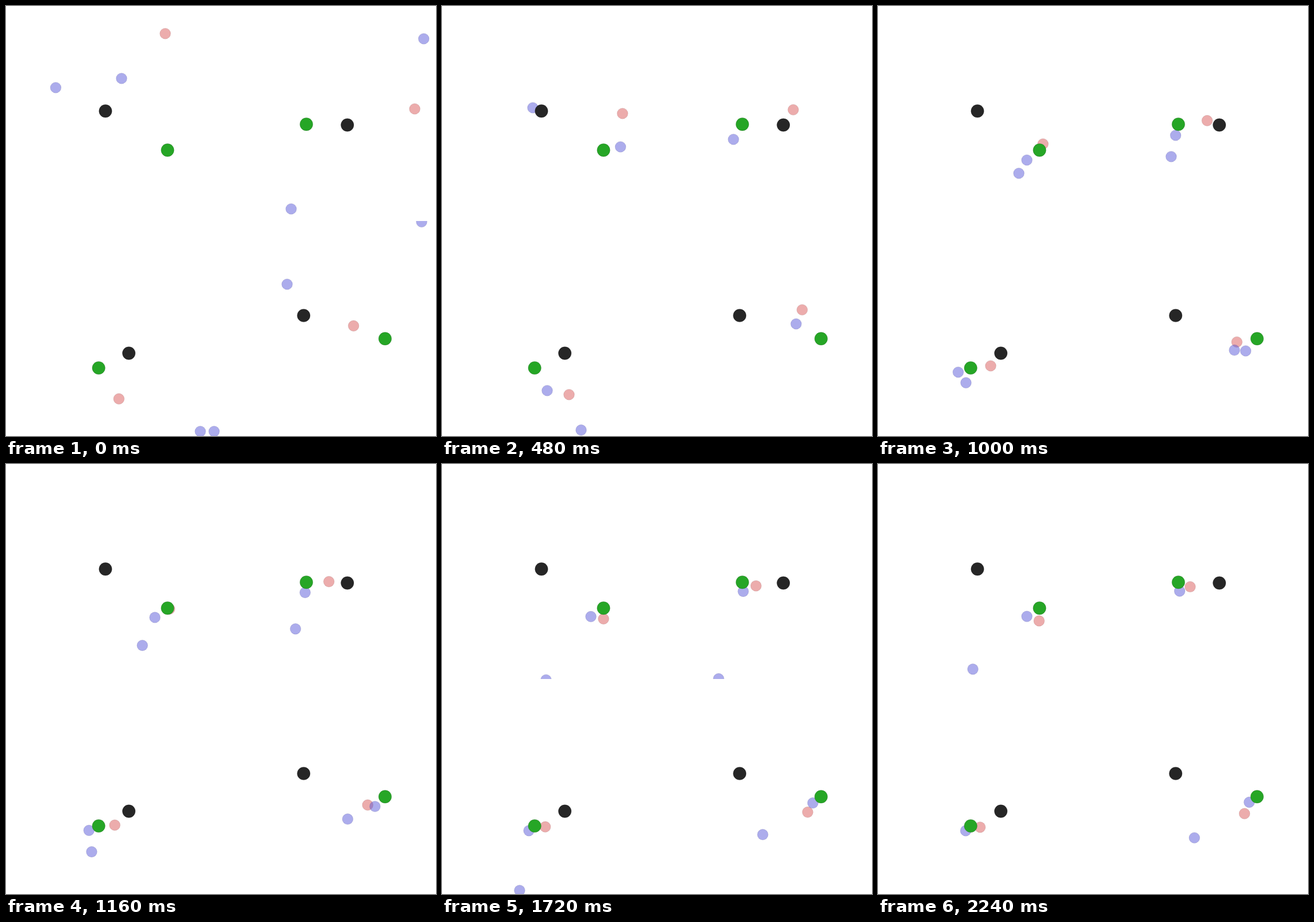
Write an HTML page with a canvas that moves like this. It is 748 px wide and 748 px high and loops after 2.28 s.

```html
<!DOCTYPE html>
<html lang="en">
<head>
<meta charset="utf-8">
<title>Four particle worlds</title>
<style>
  html, body { margin: 0; width: 100%; height: 100%; overflow: hidden; background: #fff; }
  canvas { display: block; width: 748px; height: 748px; }
</style>
</head>
<body>
<canvas id="stage" width="748" height="748"></canvas>
<script>
const ctx = document.getElementById('stage').getContext('2d');
const STEP_MS = 40, STEPS = 57, SIDE = 374;
const AGENT_R = SIDE * 0.025, MARK_R = SIDE * 0.03;
const RED = [217, 89, 89], BLUE = [89, 89, 217];
const BLACK = [38, 38, 38], GREEN = [38, 166, 38];
const SETTLE_RATE = 0.11;

// One coordinate: a smooth curve from rest through the keys, then a tail of n steps.
function curve(steps, values, endSlope, tail) {
  const last = steps.length - 1;
  const slope = i => (values[i + 1] - values[i]) / (steps[i + 1] - steps[i]);
  const tangent = i => {
    if (i === 0) return 0;
    if (i === last) return endSlope;
    const before = steps[i] - steps[i - 1], after = steps[i + 1] - steps[i];
    return (slope(i - 1) * after + slope(i) * before) / (before + after);
  };
  return step => {
    if (step >= steps[last]) return tail(step - steps[last]);
    const i = steps.findIndex(s => s > step) - 1;
    const h = steps[i + 1] - steps[i], u = (step - steps[i]) / h;
    return values[i] + (values[i + 1] - values[i]) * u * u * (3 - 2 * u) +
      h * u * (1 - u) * ((1 - u) * tangent(i) - u * tangent(i + 1));
  };
}

// Keys map a step to a point; makeTail gives the end slope and tail of one axis.
function agent(keys, makeTail) {
  const steps = Object.keys(keys).map(Number);
  const axes = [0, 1].map(axis => {
    const values = Object.values(keys).map(point => point[axis]);
    return curve(steps, values, ...makeTail(values[values.length - 1], axis));
  });
  return step => axes.map(axis => axis(step));
}

const settle = (keys, rest) => agent(keys, (from, axis) => [
  SETTLE_RATE * (rest[axis] - from),
  n => rest[axis] + (from - rest[axis]) * Math.exp(-SETTLE_RATE * n)
]);

const drift = (keys, velocity) => agent(keys, (from, axis) => [
  velocity[axis],
  n => from + velocity[axis] * n
]);

// Panels run left to right, top to bottom; agents are drawn red first.
const panels = [
  {
    black: [173, 182.7], green: [281, 250.7],
    red: settle({ 0: [277, 48], 12: [314, 187], 17: [294, 206], 25: [287, 240] }, [280, 274]),
    blues: [
      settle({ 0: [86.5, 142], 12: [158, 177], 17: [189, 228], 25: [245, 291], 34: [212, 341], 43: [181, 375.5] }, [160, 351]),
      settle({ 0: [201, 126], 12: [310.5, 245], 17: [281, 253.5], 25: [259, 268] }, [259, 265])
    ]
  },
  {
    black: [593.8, 207], green: [522.5, 205.7],
    red: settle({ 0: [711, 179], 12: [611, 180.5], 25: [572.6, 199.4] }, [542, 214]),
    blues: [
      settle({ 0: [726.7, 57], 12: [594, 207], 17: [534, 224], 25: [517.7, 225] }, [525, 221]),
      drift({ 0: [496, 353], 12: [507, 232], 17: [519.3, 225], 25: [510, 262] }, [-1.6, 6.2])
    ]
  },
  {
    black: [213.7, 604], green: [161.2, 629.6],
    red: settle({ 0: [196.4, 683.4], 12: [221, 676], 25: [196, 626] }, [177, 632]),
    blues: [
      settle({ 0: [338, 740], 12: [183, 669], 25: [139.5, 637] }, [153, 638]),
      drift({ 0: [362, 740], 12: [242, 737.7], 25: [153, 655.4] }, [-1, 4.8])
    ]
  },
  {
    black: [517.8, 538.4], green: [659.4, 578.7],
    red: settle({ 0: [604.6, 556.4], 12: [626.5, 528.5], 25: [624.3, 584.5] }, [638, 609]),
    blues: [
      settle({ 0: [489, 484], 12: [616, 553], 17: [663.5, 572], 25: [639.6, 600] }, [646, 588]),
      settle({ 0: [723, 375.5], 12: [785, 478], 25: [620, 598.7] }, [548, 652])
    ]
  }
];

function disc([x, y], radius, rgb, alpha) {
  ctx.beginPath();
  ctx.arc(x, y, radius, 0, 2 * Math.PI);
  ctx.fillStyle = `rgba(${rgb}, ${alpha})`;
  ctx.fill();
  ctx.strokeStyle = `rgba(${rgb.map(c => c >> 1)}, ${alpha / 2})`;
  ctx.stroke();
}

function draw(step) {
  ctx.clearRect(0, 0, 2 * SIDE, 2 * SIDE);
  ctx.lineWidth = 0.6;
  panels.forEach((panel, i) => {
    ctx.save();
    ctx.beginPath();
    ctx.rect(i % 2 * SIDE, (i >> 1) * SIDE, SIDE, SIDE);
    ctx.clip();
    disc(panel.red(step), AGENT_R, RED, 0.5);
    for (const blue of panel.blues) disc(blue(step), AGENT_R, BLUE, 0.5);
    disc(panel.black, MARK_R, BLACK, 1);
    disc(panel.green, MARK_R, GREEN, 1);
    ctx.restore();
  });
}

const start = performance.now();
function tick() {
  draw(Math.floor((performance.now() - start) / STEP_MS) % STEPS);
  requestAnimationFrame(tick);
}
tick();
</script>
</body>
</html>
```
